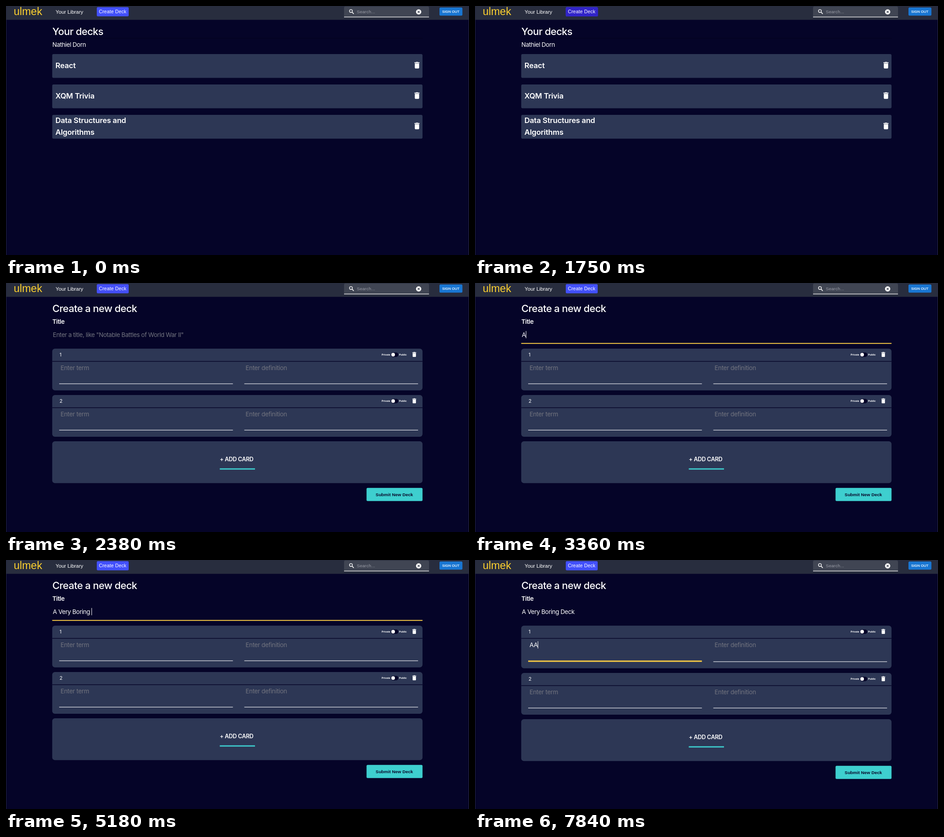
Write an HTML page that moves like this. It is 1019x549 px and loops after 8 s.

```html
<!DOCTYPE html>
<html lang="en">
<head>
<meta charset="utf-8">
<title>Flashcard decks</title>
<style>
html, body { margin: 0; width: 100%; height: 100%; overflow: hidden; background: #050428; }
svg { display: block; width: 1019px; height: 549px; }
text { fill: #fff; white-space: pre; font-family: Inter, sans-serif; }
.sans { font-family: "Liberation Sans", Arial, sans-serif; }
.brand { font-size: 23.5px; fill: #fcd02f; }
.nav { font-size: 11.3px; }
.button { font-size: 10.6px; letter-spacing: .15px; }
.search { font-size: 9.9px; letter-spacing: .09px; fill: #989ba5; }
.sign { font-size: 7.7px; letter-spacing: .1px; stroke: #fff; stroke-width: .2px; }
.heading { font-size: 22px; font-weight: 500; letter-spacing: -.55px; }
.body { font-size: 13.4px; letter-spacing: -.42px; }
.field { font-size: 13.4px; letter-spacing: -.3px; }
.label { font-size: 13.5px; font-weight: 600; letter-spacing: -.4px; }
.deck { font-size: 16.6px; font-weight: 600; letter-spacing: -.22px; }
.number { font-size: 11px; }
.tiny { font-size: 5.7px; font-weight: 700; }
.add { font-size: 12.5px; font-weight: 600; letter-spacing: -.3px; }
.submit { font-size: 9.8px; font-weight: 700; fill: #08082a; }
.hint { fill: #72747f; }
</style>
</head>
<body>
<svg id="stage" viewBox="0 0 1019 549"></svg>
<script>
const LOOP = 8000;
const PANEL = '#2d3755', BACK = '#050428', YELLOW = '#f7c943', TEAL = '#3ecfcf';
const stage = document.getElementById('stage');

function add(parent, tag, attrs, content = '') {
  const node = document.createElementNS('http://www.w3.org/2000/svg', tag);
  for (const key in attrs) node.setAttribute(key, attrs[key]);
  node.textContent = content;
  parent.append(node);
  return node;
}
const group = (parent, attrs = {}) => add(parent, 'g', attrs);
const box = (parent, x, y, width, height, fill, rx = 0) =>
  add(parent, 'rect', { x, y, width, height, fill, rx });
const label = (parent, x, y, style, content) =>
  add(parent, 'text', { x, y, class: style }, content);
const dot = (parent, cx, cy, r, fill) => add(parent, 'circle', { cx, cy, r, fill });
const show = (node, visible) => { node.style.display = visible ? '' : 'none'; };
const ramp = (t, from, to) => Math.min(1, Math.max(0, (t - from) / (to - from)));
const smooth = p => p * p * (3 - 2 * p);

function trash(parent, cx, cy, scale) {
  add(parent, 'path', {
    d: 'M-6 7q0 2 2 2h8q2 0 2-2v-12h-12zM7-8h-3.5l-1-1h-5l-1 1h-3.5v2h14z',
    transform: `translate(${cx} ${cy}) scale(${scale})`, fill: '#fff'
  });
}

// Page frame and header
box(stage, 0, 0, 1019, 549, BACK);
box(stage, 0, 0, 1019, 30.5, '#282d3e');
box(stage, 0, 0, 1, 549, '#24263f');
box(stage, 1018, 0, 1, 549, '#2a2a46');
label(stage, 17, 20, 'sans brand', 'ulmek');
label(stage, 109.3, 17, 'sans nav', 'Your Library');

box(stage, 199.8, 2.5, 70.2, 20.2, '#4250fb', 2.5);
const hover = box(stage, 199.8, 2.5, 71, 20.5, '#3124c8', 2.5);
const clip = add(stage, 'clipPath', { id: 'button' });
box(clip, 199.8, 2.5, 70.6, 20.2, '#000', 2.5);
const ripple = dot(group(stage, { 'clip-path': 'url(#button)' }), 239, 12.5, 0, '#fff');
label(stage, 204.4, 16.3, 'sans button', 'Create Deck');

box(stage, 744, 1, 187, 24, '#404553', 3);
box(stage, 744, 23.7, 187, 1.3, '#f0f0f2');
add(stage, 'path', {
  d: 'M761.8 13.8l3.6 3.6', stroke: '#fff', 'stroke-width': 1.6
});
add(stage, 'circle', { cx: 759.2, cy: 11.1, r: 3.2, fill: 'none', stroke: '#fff', 'stroke-width': 1.4 });
label(stage, 772, 15.8, 'sans search', 'Search...');
dot(stage, 908.2, 13, 5.8, '#fff');
add(stage, 'path', {
  d: 'M905.9 10.7l4.6 4.6m0-4.6l-4.6 4.6', stroke: '#404553', 'stroke-width': 1.3
});
box(stage, 954, 3.2, 50.5, 18, '#1976d2', 2.5);
label(stage, 960, 14.9, 'sans sign', 'SIGN OUT');

// Library page
const library = group(stage);
label(library, 102, 64, 'heading', 'Your decks');
box(library, 102, 70.5, 815, 1, '#04031c');
label(library, 102, 90.4, 'body', 'Nathiel Dorn');
[['React'], ['XQM Trivia'], ['Data Structures and', 'Algorithms']].forEach((lines, i) => {
  const y = 106 + i * 67;
  box(library, 101.7, y, 815, 52.4, PANEL, 3);
  lines.forEach((line, n) =>
    label(library, 108.8, y + (lines.length > 1 ? 17.6 + n * 26.4 : 30.7), 'deck', line));
  trash(library, 904.5, y + 24.5, .8);
});

// Deck editor
const editor = group(stage);
label(editor, 102, 64, 'heading', 'Create a new deck');
label(editor, 102, 89.6, 'label', 'Title');

function input(parent, x, y, style, placeholder) {
  const hint = label(parent, x, y, style + ' hint', placeholder);
  const value = label(parent, x, y, style, '');
  const caret = box(parent, x, y - 13, 1, 16, '#fff');
  return (text, caretOn) => {
    if (value.textContent !== text) value.textContent = text;
    show(hint, !text);
    show(caret, caretOn);
    caret.setAttribute('x', x + (text ? value.getComputedTextLength() : 0));
  };
}
const setTitle = input(editor, 103, 118.8, 'body',
  'Enter a title, like "Notable Battles of World War II"');
const titleLine = box(editor, 101.7, 132.2, 815, 2, YELLOW);

function card(parent, number, y) {
  const g = group(parent, { transform: `translate(0 ${y})` });
  const panel = box(g, 101.7, 0, 815, 92, PANEL, 6);
  box(g, 101.7, 27.2, 815, 1.4, BACK);
  label(g, 117.8, 17.2, 'number', number);
  label(g, 826.8, 15.2, 'sans tiny', 'Private');
  box(g, 847, 8.4, 16.5, 9.8, BACK, 4.9);
  dot(g, 852, 13.3, 4, '#fff');
  label(g, 864.9, 15.2, 'sans tiny', 'Public');
  trash(g, 898.6, 12.8, .61);
  const setTerm = input(g, 120, 47.4, 'field', 'Enter term');
  setTerm('', false);
  label(g, 527.3, 47.4, 'field hint', 'Enter definition');
  const lines = [117, 524.5].map(x => box(g, x, 76.8, 382.4, 1.2, '#e8e9ee'));
  return { panel, setTerm, lines };
}
const first = card(editor, '1', 144.8);
const below = group(editor);
card(below, '2', 247);
box(below, 101.7, 349, 815, 92.3, PANEL, 6);
label(below, 470.5, 393.4, 'add', '+ ADD CARD');
box(below, 470.5, 408.6, 77.5, 2.8, TEAL);
box(below, 793.5, 451.8, 123.2, 29, TEAL, 2.5);
label(below, 813.6, 470, 'sans submit', 'Submit New Deck');

// Typing: one time per character
const TITLE = 'A Very Boring Deck';
const TITLE_KEYS = [3360, 3570, 3850, 4060, 4130, 4270, 4410, 4620, 4690,
  4830, 4970, 5040, 5110, 5180, 5460, 5600, 5880, 5950];
const TERM = 'AA';
const TERM_KEYS = [7490, 7700];
const PAGE_OPEN = 1820, TITLE_FOCUS = 2870, TERM_FOCUS = 7070;
const typed = (text, keys, t) => text.slice(0, keys.filter(k => k <= t).length);

function render(t) {
  show(library, t < PAGE_OPEN);
  show(editor, t >= PAGE_OPEN);

  hover.style.opacity = smooth(ramp(t, 1235, 1500)) - smooth(ramp(t, 2160, 2440));
  ripple.setAttribute('r', t < PAGE_OPEN ? 0 : 15 + 50 * ramp(t, PAGE_OPEN, 2150));
  ripple.style.opacity = .22 * (1 - ramp(t, 1950, 2420));

  const titleFocus = t >= TITLE_FOCUS && t < TERM_FOCUS;
  const blinkOff = t >= 6510 && t < 7000;
  setTitle(typed(TITLE, TITLE_KEYS, t), titleFocus && !blinkOff);
  show(titleLine, titleFocus);

  const termFocus = t >= TERM_FOCUS;
  const shift = termFocus ? 2 : 0;
  first.setTerm(typed(TERM, TERM_KEYS, t), termFocus);
  first.panel.setAttribute('height', 92 + shift);
  first.lines[0].setAttribute('height', termFocus ? 3 : 1.2);
  first.lines[0].setAttribute('fill', termFocus ? YELLOW : '#e8e9ee');
  first.lines[1].setAttribute('y', 76.8 + shift);
  below.setAttribute('transform', `translate(0 ${shift})`);
}

const start = performance.now();
function tick() {
  render((performance.now() - start) % LOOP);
  requestAnimationFrame(tick);
}
tick();
</script>
</body>
</html>
```
